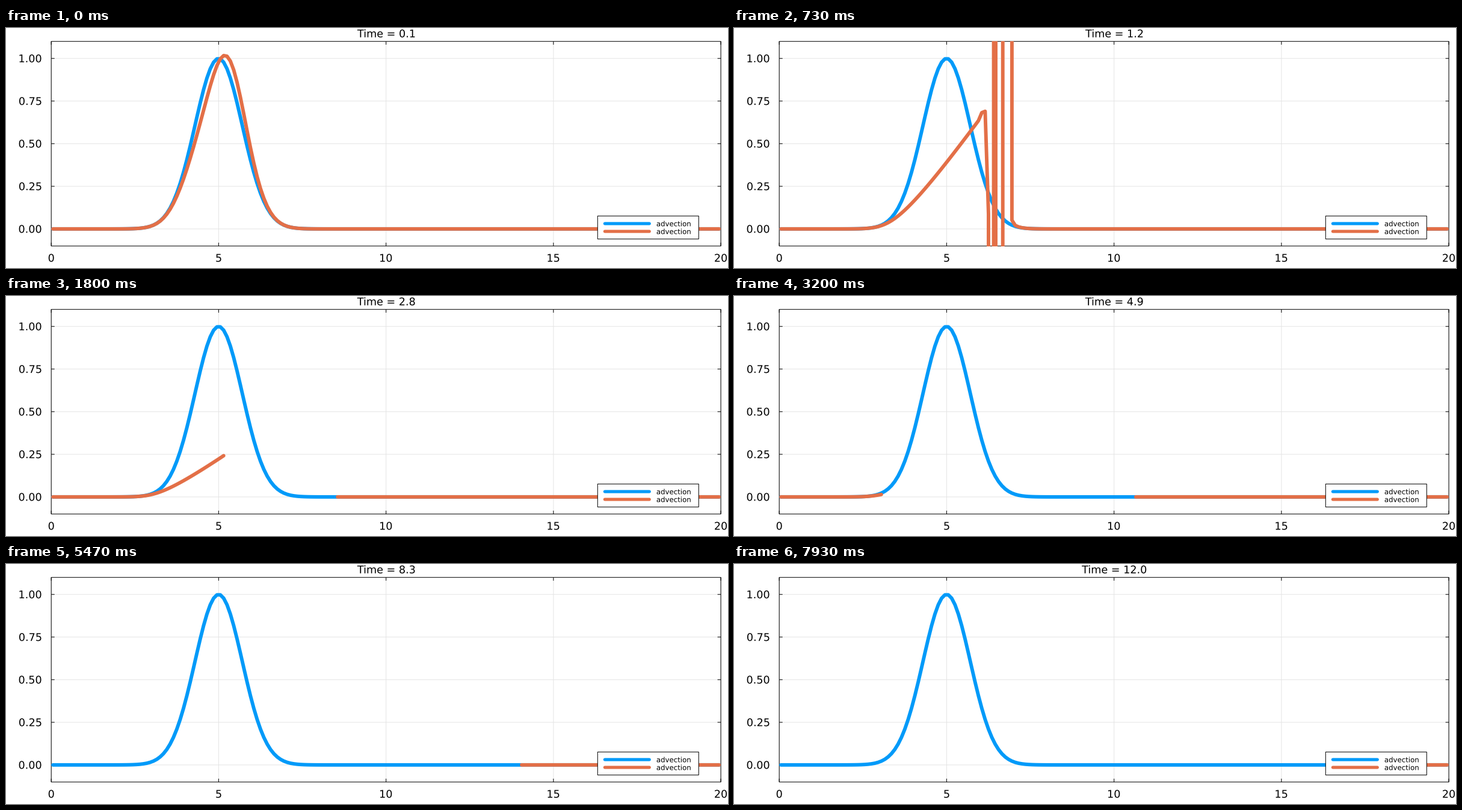
A matplotlib script for the animation above (8 s loop, 1200 by 400 pixels).

```python
import numpy as np
import matplotlib.pyplot as plt
from matplotlib.animation import FuncAnimation
from matplotlib.patches import PathPatch, Rectangle
from matplotlib.path import Path
from matplotlib.textpath import TextPath

plt.rcParams.update({"font.family": "DejaVu Sans", "path.simplify": False})

W, H, DPI = 1200, 400, 100
LEFT, RIGHT, TOP, BOTTOM = 75.2, 1188.1, 22.3, 363.3
BLUE, ORANGE, GRID = "#009AF9", "#E36F47", "#E5E5E5"
STEPS, LOOP_MS, TICK_MS = 120, 8000, 20
DX = DT = 0.1
SPEED = 1.0


def pt(px):
    return px * 72 / DPI


def sx(x):
    return LEFT + np.asarray(x) / 20 * (RIGHT - LEFT)


def sy(y):
    return BOTTOM - (np.asarray(y) + 0.1) / 1.2 * (BOTTOM - TOP)


def advance(u):
    """One explicit upwind step of u_t + c (u^2)_x = 0."""
    flux = u * u
    back = np.diff(flux, prepend=flux[0])
    ahead = np.diff(flux, append=flux[-1])
    # The zero factor still spreads NaN upstream.
    return u - DT / DX * (max(SPEED, 0.0) * back + min(SPEED, 0.0) * ahead)


def trim(x, y, low=-1.0, high=2.0):
    """Cut segments to a finite band and leave gaps at non-finite points."""
    px, py = [], []
    for x0, x1, y0, y1 in zip(x, x[1:], y, y[1:]):
        if not (np.isfinite(y0) and np.isfinite(y1)):
            px.append(np.nan)
            py.append(np.nan)
            continue
        ends = np.clip([y0, y1], low, high)
        t = np.array([0.0, 1.0])
        if y0 != y1:
            t = np.clip((ends - y0) / (y1 - y0), 0, 1)
        px.extend(x0 + t * (x1 - x0))
        py.extend(ends)
    return sx(px), sy(py)


def glyphs(px, base, text, size=17.6, align=0.5):
    """Outline of a text whose ink is aligned at px (0 left, 1 right)."""
    path = TextPath((0, 0), text, size=size)
    xs, ys = path.vertices.T
    box = path.get_extents()
    shift = px - box.x0 - align * box.width
    return Path(np.column_stack([xs + shift, base - ys]), path.codes)


x = np.arange(200) * DX + DX / 2
start = np.exp(-(x - 5) ** 2)

curves, titles, u = [], [], start
with np.errstate(all="ignore"):
    for n in range(STEPS):
        u = advance(u)
        curves.append(trim(x, u))
        titles.append(glyphs(sx(10), 15.5, f"Time = {(n + 1) * DT:.1f}"))

fig = plt.figure(figsize=(W / DPI, H / DPI), dpi=DPI, facecolor="white")
ax = fig.add_axes([0, 0, 1, 1])
ax.set(xlim=(0, W), ylim=(H, 0))
ax.axis("off")


def line(xs, ys, color="black", width=1.0, z=1, cap="butt"):
    return ax.plot(xs, ys, color=color, lw=pt(width), zorder=z, snap=False,
                   solid_capstyle=cap, solid_joinstyle="round")[0]


def box(x0, y0, x1, y1, fill, z):
    ax.add_patch(Rectangle((x0, y0), x1 - x0, y1 - y0, fc=fill, ec="black",
                           lw=pt(1), snap=False, zorder=z))


def ink(path, z=7):
    return ax.add_patch(PathPatch(path, fc="black", lw=0, snap=False, zorder=z))


TICK = 5.5
for v in range(0, 21, 5):
    p = float(sx(v))
    line([p, p], [TOP, BOTTOM], GRID)
    line([p, p], [BOTTOM, BOTTOM - TICK], z=2)
    line([p, p], [TOP, TOP + TICK], z=2)
    ink(glyphs(p, 389.5, str(v)))

for v in np.arange(0, 1.01, 0.25):
    p = float(sy(v))
    line([LEFT, RIGHT], [p, p], GRID)
    line([LEFT, LEFT + TICK], [p, p], z=2)
    line([RIGHT, RIGHT - TICK], [p, p], z=2)
    ink(glyphs(58.5, p + 6.4, f"{v:.2f}", align=1))

box(LEFT, TOP, RIGHT, BOTTOM, "none", 2)

clip = Rectangle((75, 22), 1114, 342, transform=ax.transData)
initial = line(sx(x), sy(start), BLUE, 5.9, z=3, cap="round")
wave = line([], [], ORANGE, 5.9, z=4, cap="round")
for curve in (initial, wave):
    curve.set_clip_path(clip)

box(983.3, 313.3, 1151.3, 351.7, "white", 6)
for y, color in ((326, BLUE), (339, ORANGE)):
    line([995.3, 1069.3], [y, y], color, 5.2, z=7, cap="round")
    ink(glyphs(1081.6, y + 4.4, "advection", 11.75, align=0))

title = ink(titles[0])


def update(k):
    # Steps last 66.7 ms, rounded onto the tick grid.
    n = int((k * TICK_MS + 14) * STEPS / LOOP_MS)
    wave.set_data(*curves[n])
    title.set_path(titles[n])
    return wave, title


anim = FuncAnimation(fig, update, frames=LOOP_MS // TICK_MS, interval=TICK_MS,
                     repeat=True, repeat_delay=0, blit=False)
plt.show()
```
